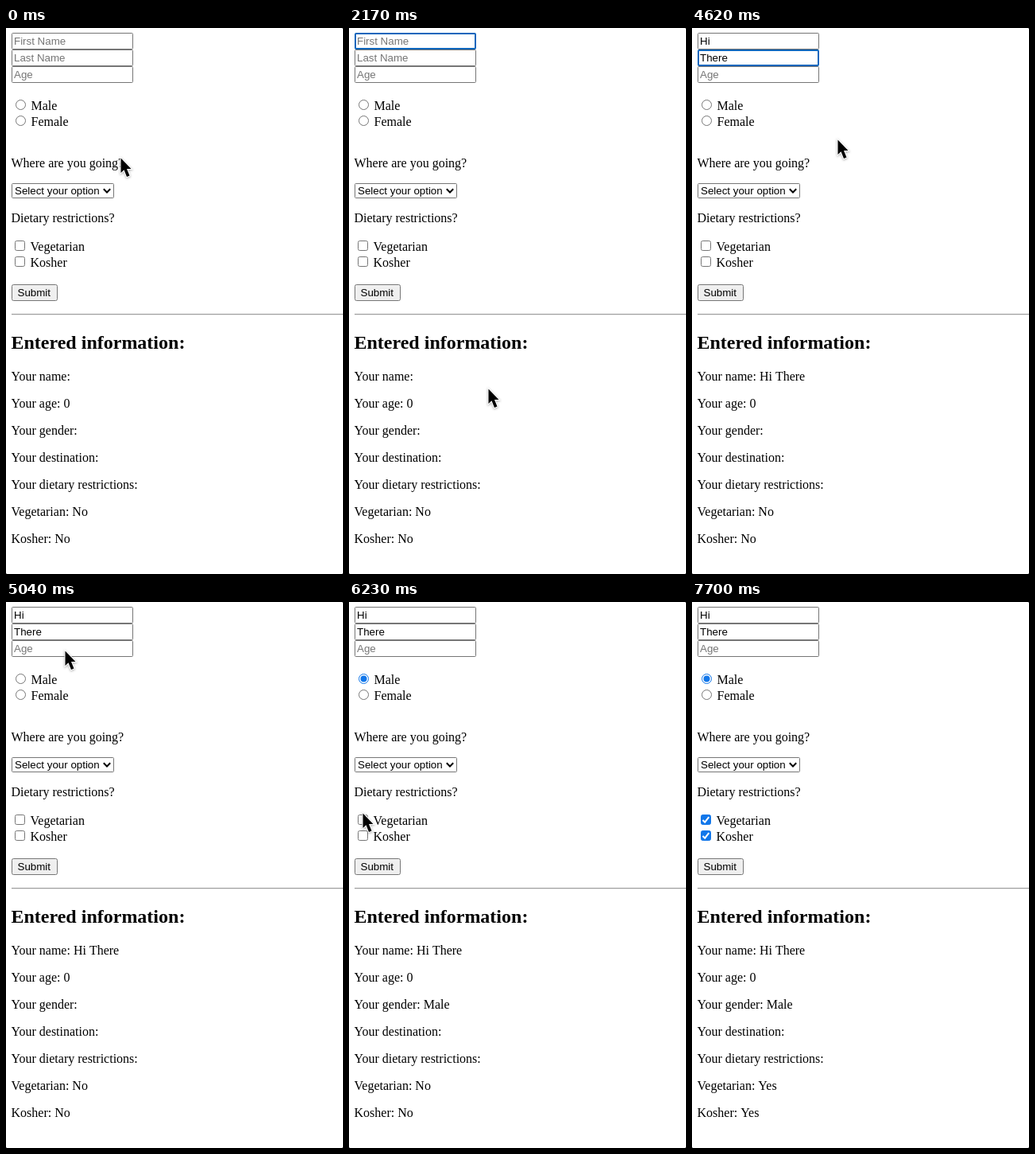
Animation of 424x686 px, one loop 8.05 s. Source, as an HTML page with a canvas:

```html
<!DOCTYPE html>
<html lang="en">
<head>
<meta charset="utf-8">
<title>Travel form</title>
<style>
  html, body { margin: 0; width: 424px; height: 686px; overflow: hidden; background: #fff; }
  canvas { display: block; }
</style>
</head>
<body>
<canvas width="424" height="686"></canvas>
<script>
const c = document.querySelector('canvas').getContext('2d');
const LOOP = 8050, STEP = 70, BLINK = 500, LEFT = 6.5;
const SERIF = '16px "Liberation Serif", serif';
const SANS = '13.333px "Liberation Sans", sans-serif';
const GRAY = '#767676', BLUE = '#1277ea', RING = '#0d66bc';

const fields = [
  { hint: 'First Name', text: 'Hi', focus: 1260, blur: 2660, start: 2240, pace: 210 },
  { hint: 'Last Name', text: 'There', focus: 2640, blur: 4970, start: 3220, pace: 120 },
  { hint: 'Age', text: '' }
];
const clicks = { male: 5810, vegetarian: 6510, kosher: 6930 };

// Pointer stops; it glides between them and is hidden while typing.
const stop = (at, x, y, rest = 0) => ({ at, x, y, leave: at + rest });
const visits = [
  [stop(0, 144, 162), stop(140, 60, 14), stop(350, 200, 616), stop(420, 174, 485, 70),
   stop(1190, 114, 17, 350), stop(1750, 175, 452, 420)],
  [stop(4270, 150, 193), stop(4620, 183, 139), stop(5040, 74, 60), stop(5460, 21, 101, 350),
   stop(6230, 17, 264, 280), stop(6650, 14, 287, 420), stop(7280, 74, 560, 70), stop(7700, 36, 690)]
];

const clamp = v => Math.min(1, Math.max(0, v));
const ease = p => p * p * (3 - 2 * p);

function label(text, x, y, font = SERIF, color = '#000') {
  c.font = font;
  c.fillStyle = color;
  c.fillText(text, x, y);
}

function box(x, y, w, h, radius, stroke, fill = '#fff', width = 1) {
  c.beginPath();
  c.roundRect(x + width / 2, y + width / 2, w - width, h - width, radius);
  c.fillStyle = fill;
  c.fill();
  c.lineWidth = width;
  c.strokeStyle = stroke;
  c.stroke();
}

function circle(y, r, color, fill) {
  c.beginPath();
  c.arc(18.5, y, r, 0, 7);
  c.lineWidth = 1;
  c.fillStyle = c.strokeStyle = color;
  fill ? c.fill() : c.stroke();
}

// A small tick or chevron: left, middle and right heights around x.
function vee(x, y, left, right, rise, color) {
  c.beginPath();
  c.moveTo(x - left, y - left);
  c.lineTo(x, y);
  c.lineTo(x + right, y - rise);
  c.lineWidth = 2;
  c.strokeStyle = color;
  c.stroke();
}

function typed({ text, start, pace }, t) {
  return t < start ? '' : text.slice(0, 1 + Math.floor((t - start) / pace));
}

function input(field, y, t) {
  const value = typed(field, t);
  const focused = t >= field.focus && t < field.blur;
  box(7, y, 153, 21, 1, focused ? RING : GRAY, '#fff', focused ? 2 : 1);
  label(value || field.hint, 10, y + 15, SANS, value ? '#000' : '#757575');
  const lastKey = value ? field.start + (value.length - 1) * field.pace : field.focus;
  if (focused && (t - lastKey) % (2 * BLINK) < BLINK)
    c.fillRect(11 + (value && Math.round(c.measureText(value).width)), y + 3, 1, 15);
}

function radio(y, text, on) {
  circle(y, 6, on ? BLUE : GRAY);
  if (on) circle(y, 4, BLUE, true);
  label(text, 31.5, y + 6.5);
}

function checkbox(y, text, on) {
  box(11, y, 13, 13, 2, on ? BLUE : GRAY, on ? BLUE : '#fff');
  if (on) vee(16.2, y + 9.7, 2.7, 5.1, 6.5, '#fff');
  label(text, 30.5, y + 13);
}

function pointer(t) {
  const stops = visits.find(v => t >= v[0].at && t <= v.at(-1).leave);
  if (!stops) return;
  const i = stops.findLastIndex(s => s.at <= t);
  const from = stops[i], to = stops[i + 1] || from;
  const p = to === from ? 0 : ease(clamp((t - from.leave) / (to.at - from.leave)));
  c.save();
  c.translate(from.x + (to.x - from.x) * p + 0.5, from.y + (to.y - from.y) * p + 1.5);
  const arrow = new Path2D('M0 0V18.5L4 14.8L7.5 23.5L11 22L7.5 13.5H13Z');
  c.lineWidth = 2;
  c.strokeStyle = '#fff';
  c.shadowColor = 'rgba(0,0,0,.35)';
  c.shadowBlur = 3;
  c.shadowOffsetY = 1;
  c.stroke(arrow);
  c.shadowColor = 'transparent';
  c.fillStyle = '#000';
  c.fill(arrow);
  c.restore();
}

function draw(t) {
  const male = t >= clicks.male, vegetarian = t >= clicks.vegetarian, kosher = t >= clicks.kosher;
  const yesNo = on => on ? 'Yes' : 'No';

  c.fillStyle = '#fff';
  c.fillRect(0, 0, 424, 686);

  fields.forEach((field, i) => input(field, 6 + 21 * i, t));
  radio(96.5, 'Male', male);
  radio(116.5, 'Female', false);

  label('Where are you going?', LEFT, 175);
  box(7, 195, 129, 19, 1, GRAY);
  label('Select your option', 11, 209, SANS);
  vee(127, 206.5, 4.2, 4.2, 4.2, '#000');

  label('Dietary restrictions?', LEFT, 244);
  checkbox(267, 'Vegetarian', vegetarian);
  checkbox(287, 'Kosher', kosher);

  box(7, 322, 58, 21, 2, GRAY, '#efefef');
  label('Submit', 14.5, 337, SANS);
  c.fillStyle = '#a0a0a0';
  c.fillRect(7, 359, 417, 1);
  c.fillStyle = '#e4e4e4';
  c.fillRect(7, 360, 417, 1);

  label('Entered information:', LEFT, 403, 'bold 24px "Liberation Serif", serif');
  [
    'Your name: ' + fields.map(f => typed(f, t)).join(' ').trim(),
    'Your age: 0',
    'Your gender: ' + (male ? 'Male' : ''),
    'Your destination:',
    'Your dietary restrictions:',
    'Vegetarian: ' + yesNo(vegetarian),
    'Kosher: ' + yesNo(kosher)
  ].forEach((line, i) => label(line, LEFT, 443 + 34 * i));

  // Rounded window corners
  c.fillStyle = '#888';
  [[423, 0], [0, 685], [423, 685]].forEach(([x, y]) => c.fillRect(x, y, 1, 1));

  pointer(t);
}

function frame(now) {
  draw(Math.floor(now % LOOP / STEP) * STEP);
  requestAnimationFrame(frame);
}
requestAnimationFrame(frame);
</script>
</body>
</html>
```
